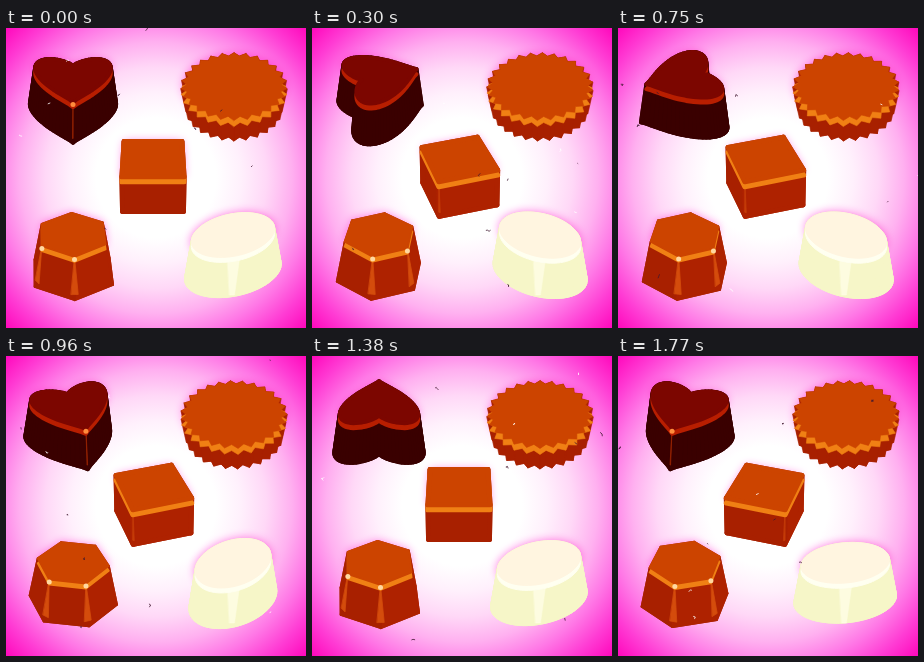
Write an HTML page with a canvas that moves like this. It is 300 px wide and 300 px high and loops after 1.8 s.

```html
<!DOCTYPE html>
<html>
<head>
<meta charset="utf-8">
<title>Chocolates</title>
<style>
  html, body { margin: 0; width: 100%; height: 100%; overflow: hidden; }
  canvas { display: block; width: 300px; height: 300px; }
</style>
</head>
<body>
<canvas id="stage" width="300" height="300"></canvas>
<script>
const ctx = document.getElementById('stage').getContext('2d');
const TAU = Math.PI * 2, TILT = 0.61, DEPTH = 0.0012;
const FRAME = 30, FRAMES = 60, STEP = Math.PI / 10;

const backdrop = ctx.createRadialGradient(150, 150, 60, 150, 150, 212);
['#fff', '#fff0fc', '#ffd8f7', '#ffb0f0', '#ff78e6', '#ff3cd4', '#ff08bc']
  .forEach((color, i) => backdrop.addColorStop(i / 6, color));

// Outlines seen from above: x to the right, z towards the viewer.
const outline = (n, fn) => Array.from({ length: n }, (_, i) => fn(i * TAU / n, i));
const ring = (n, rx, rz = rx, turn = 0) =>
  outline(n, a => spin([rx * Math.sin(a), rz * Math.cos(a)], turn));
function spin([x, z], a) {
  const c = Math.cos(a), s = Math.sin(a);
  return [x * c + z * s, z * c - x * s];
}

const heart = outline(72, a => {
  const x = -Math.sin(a);
  const y = -Math.cos(a) + 0.9 * Math.abs(x) ** 0.8;
  return [-38.5 * x, 11 - 29 * y];
});
const tart = outline(52, (a, i) => {
  const r = i % 2 ? 47.5 : 53;
  return [r * Math.sin(a), r * Math.cos(a)];
});
const milk = { top: '#cc4400', left: '#a82000', right: '#ae2200', band: '#f08014' };
const pieces = [
  { pts: heart, x: 67, y: 48.5, h: 37, base: 1.14, round: 4, bandSize: 5,
    top: '#7c0600', left: '#3a0000', right: '#3a0000', band: '#b81e00',
    glints: [0], near: 18, wedge: 0.02, glint: '#9a2400', dot: '#ff8c3c' },
  { ...milk, pts: tart, x: 228, y: 56.5, h: 24, base: 0.9, round: 0.6, bandSize: 6,
    tilt: 0.64, right: '#a82000' },
  { ...milk, pts: ring(4, 42.4, 42.4, Math.PI / 4), x: 147, y: 130.5, h: 35, base: 0.98, round: 5,
    bandSize: 5, tilt: 0.59, glints: [0, 1, 2, 3], near: 33, wedge: 0.02, glint: '#c43c08' },
  { ...milk, pts: ring(6, 36, 36, 0.04), x: 67, y: 206, h: 38, base: 1.23, round: 2, bandSize: 5,
    glints: [0, 1, 2, 3, 4, 5], near: 18, wedge: 0.1, glint: '#d44c0c', dot: '#ffd8a0' },
  { pts: ring(72, 45, 32.5, 0.58), x: 227.5, y: 206, h: 36.5, base: 1.16, round: 1, bandSize: 5,
    top: '#fff5e0', left: '#f6f6c8', right: '#f6f6c8', band: '#fffff0', shine: '#fdfce0' }
];

function trace(pts) {
  pts.forEach((p, i) => i ? ctx.lineTo(p[0], p[1]) : ctx.moveTo(p[0], p[1]));
  ctx.closePath();
}
function face(pts, color, width) {
  ctx.beginPath();
  trace(pts);
  ctx.fillStyle = ctx.strokeStyle = color;
  ctx.lineWidth = width;
  ctx.fill();
  ctx.stroke();
}
const mix = (a, b, t) => a.map((v, i) => v + (b[i] - v) * t);

function drawPiece(p, angle) {
  const flat = p.pts.map(q => spin(q, angle));
  const tilt = p.tilt || TILT, n = flat.length;
  const project = (scale, drop) => flat.map(([x, z]) => {
    const k = scale * (1 + z * DEPTH);
    return [p.x + x * k, p.y + drop + z * k * tilt];
  });
  const top = project(1, 0), base = project(p.base, p.h);
  const sides = flat.map(([x, z], i) => {
    const j = (i + 1) % n;
    return { quad: [top[i], top[j], base[j], base[i]], z: z + flat[j][1], x: x + flat[j][0] };
  }).sort((a, b) => a.z - b.z);

  // The glow multiplies, so it is faint on white and hot on pink.
  ctx.save();
  ctx.globalCompositeOperation = 'multiply';
  ctx.shadowColor = '#ff70e0';
  ctx.shadowBlur = 10;
  ctx.beginPath();
  trace(top);
  trace(base);
  sides.forEach(s => trace(s.quad));
  ctx.fillStyle = p.left;
  ctx.fill();
  ctx.restore();

  face(base, p.left, p.round);
  sides.forEach(s => face(s.quad, s.x > 0 ? p.right : p.left, p.round));
  if (p.shine) face([[p.x - 6, p.y + 25], [p.x + 6, p.y + 25], [p.x + 1, p.y + 61], [p.x - 4, p.y + 61]], p.shine, 0.5);

  const front = (p.glints || []).filter(i => flat[i][1] > p.near);
  front.forEach(i => {
    const foot = j => mix(top[i], mix(base[i], base[(j + n) % n], p.wedge), 0.9);
    face([top[i], foot(i + 1), foot(i - 1)], p.glint, 0.8);
  });

  face(top.map(([x, y]) => [x, y + p.bandSize]), p.band, p.round);
  face(top, p.top, p.round);
  if (p.dot) front.forEach(i => {
    ctx.beginPath();
    ctx.arc(top[i][0], top[i][1] + 2.5, 2.5, 0, TAU);
    ctx.fillStyle = p.dot;
    ctx.fill();
  });
}

// Film dust: a few tiny scratches, new on every frame.
function drawDust(frame) {
  let seed = frame * 7919 + 17;
  const rnd = () => {
    seed = (seed * 1664525 + 1013904223) % 4294967296;
    return seed / 4294967296;
  };
  rnd();
  ctx.lineWidth = 0.8;
  for (let i = 0; i < 9; i++) {
    let x = rnd() * 300, y = rnd() * 300;
    ctx.strokeStyle = i < 6 ? '#401830' : '#fff';
    ctx.beginPath();
    ctx.moveTo(x, y);
    for (let k = 0; k < 1 + i % 3; k++) {
      x += rnd() * 4 - 2;
      y += rnd() * 4 - 2;
      ctx.lineTo(x, y);
    }
    ctx.stroke();
  }
}

const start = performance.now();
function draw() {
  const frame = Math.floor((performance.now() - start) / FRAME) % FRAMES;
  // Each pose lasts one and a half frames.
  const angle = Math.floor(frame * 2 / 3) * STEP;
  ctx.fillStyle = backdrop;
  ctx.fillRect(0, 0, 300, 300);
  ctx.lineJoin = ctx.lineCap = 'round';
  pieces.forEach(p => drawPiece(p, angle));
  drawDust(frame);
  requestAnimationFrame(draw);
}
draw();
</script>
</body>
</html>
```
